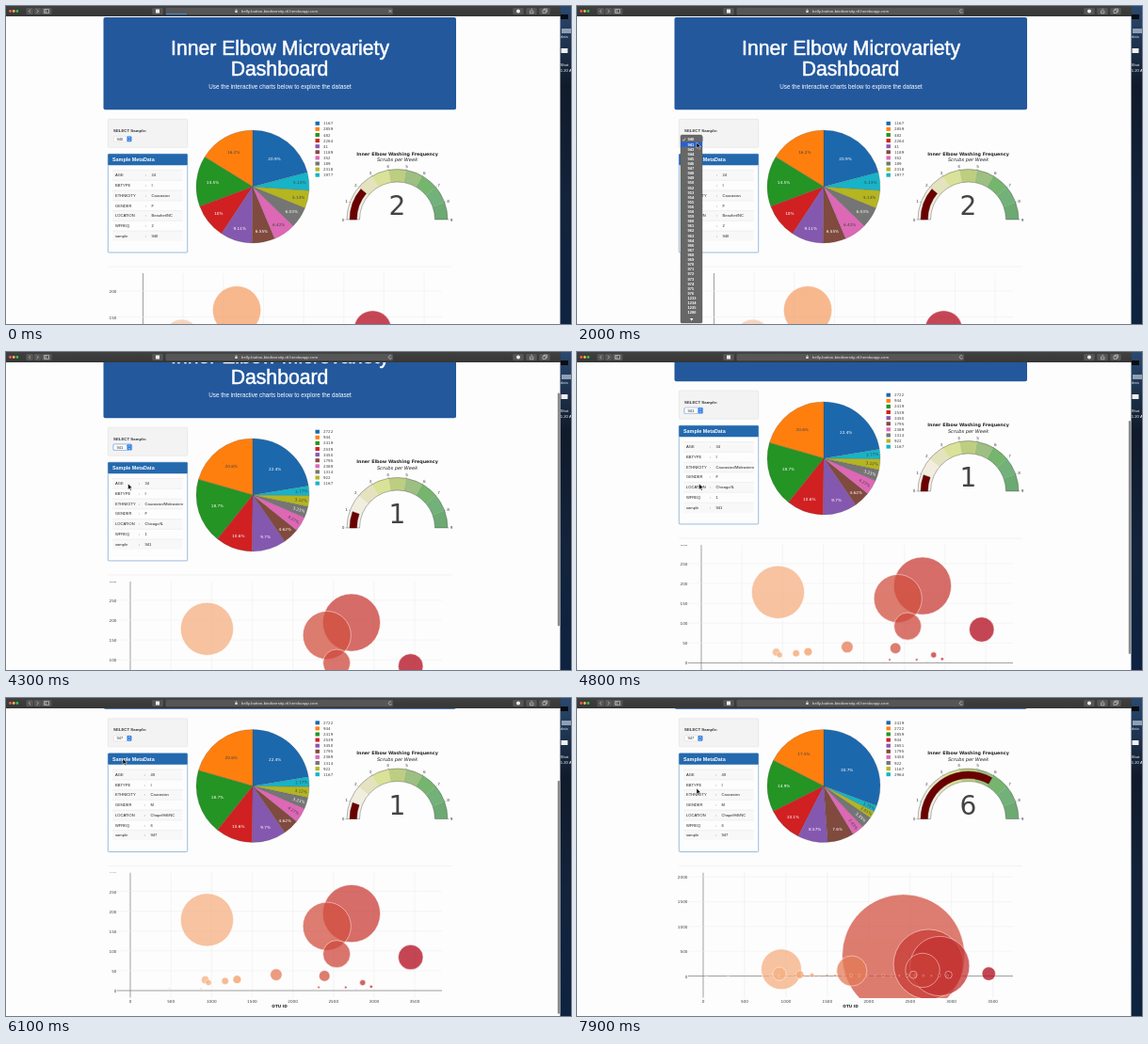
Animation of 600x338 px, one loop 8 s. Source, as an HTML page:

```html
<!DOCTYPE html>
<html lang="en">
<head>
<meta charset="utf-8">
<title>Sample dashboard</title>
<style>
html, body { margin: 0; width: 100%; height: 100%; overflow: hidden; background: #fff; }
svg { display: block; width: 100%; height: 100%; font-family: "Liberation Sans", Arial, sans-serif; }
.plot { font: 4.2px "DejaVu Sans", Verdana, sans-serif; fill: #444; }
.title { font-size: 21.2px; fill: #fff; stroke: #fff; stroke-width: .5; }
.mid { text-anchor: middle; }
.end { text-anchor: end; }
.bold { font-weight: bold; }
</style>
</head>
<body>
<svg id="stage" viewBox="0 0 600 338"></svg>
<script>
const LOOP = 8000;
const PIE = ['#1c68ad', '#ff7f0e', '#249424', '#d02022', '#8558b0', '#804a3e', '#dd68b5', '#757575', '#b5b520', '#17b3c8'];
const DARK_LABEL = [1, 6, 8, 9];
const STEPS = ['240,230,215', '232,226,202', '210,206,145', '190,206,75', '140,170,35', '85,145,35', '14,127,0', '10,120,22', '0,105,11'];

const samples = [
  { id: 940, meta: [24, 'I', 'Caucasian', 'F', 'Beaufort/NC', 2], freq: 2, col: 148,
    otu: [1167, 2859, 482, 2264, 41, 1189, 352, 189, 2318, 1977],
    val: [163, 126, 113, 78, 71, 51, 50, 47, 40, 40],
    small: [], x0: 145.5, kx: .0853, y0: 413, ky: .55, step: 50, lo: 41, hi: 2859 },
  { id: 941, meta: [34, 'I', 'Caucasian/Mideastern', 'F', 'Chicago/IL', 1], freq: 1, col: 141,
    otu: [2722, 944, 2419, 2539, 3450, 1795, 2389, 1314, 922, 1167],
    val: [194, 178, 162, 92, 84, 40, 37, 28, 27, 24],
    small: [[963, 20], [2859, 20], [2964, 10], [2318, 8], [2651, 8], [482, 5], [870, 5], [1960, 3], [2250, 3], [2780, 3], [2907, 3]],
    x0: 132, kx: .0863, y0: 409.5, ky: .422, step: 50, lo: -200, hi: 3450 },
  { id: 947, meta: [49, 'I', 'Caucasian', 'M', 'ChapelHill/NC', 6], freq: 6, col: 147,
    otu: [2419, 2722, 2859, 944, 2651, 1795, 3450, 922, 1167, 2964],
    val: [412, 235, 200, 136, 115, 102, 46, 45, 27, 24],
    small: [[2539, 25], [1314, 15], [41, 8], [302, 7], ...Array.from({ length: 24 }, (_, i) => [720 + i * 97, 5 + i * 5 % 7])],
    x0: 134, kx: .0879, y0: 394, ky: .0527, step: 500, lo: -200, hi: 3450 }
];

const range = (a, b) => Array.from({ length: b - a + 1 }, (_, i) => a + i);
const choices = [940, 941, ...range(943, 950), ...range(952, 956), ...range(958, 964), ...range(966, 976), 1233, 1234, 1235, 1286];
const ROW = 5.11;

const text = (x, y, s, attrs = '') => `<text x="${x}" y="${y}" ${attrs}>${s}</text>`;
const rect = (x, y, w, h, fill, attrs = '') => `<rect x="${x}" y="${y}" width="${w}" height="${h}" fill="${fill}" ${attrs}/>`;
const circle = (x, y, r, fill, attrs = '') => `<circle cx="${x}" cy="${y}" r="${r}" fill="${fill}" ${attrs}/>`;
const path = (d, attrs) => `<path d="${d}" ${attrs}/>`;
const line = (x1, y1, x2, y2, color, w = .5) => path(`M${x1} ${y1}L${x2} ${y2}`, `stroke="${color}" stroke-width="${w}"`);
// Angles run clockwise from twelve o'clock, in radians.
const polar = (cx, cy, r, a) => [cx + r * Math.sin(a), cy - r * Math.cos(a)];

function pie({ val, otu }) {
  const cx = 262, cy = 192, R = 60, sum = val.reduce((a, b) => a + b);
  let back = 0;
  return val.map((v, i) => {
    const f = v / sum, sweep = f * 2 * Math.PI;
    const a = i ? back -= sweep : 0, m = a + sweep / 2;
    const slice = path(`M${cx} ${cy}L${polar(cx, cy, R, a)}A${R} ${R} 0 0 1 ${polar(cx, cy, R, a + sweep)}Z`,
      `fill="${PIE[i]}" stroke="#444" stroke-width=".2"`);
    const [x, y] = polar(cx, cy, R * (.9 - 1.3 * f), m);
    const turn = f < .046 ? m * 180 / Math.PI - 90 + (Math.sin(m) < 0 ? 180 : 0) : 0;
    const label = text(0, 1.5, +(f * 100).toPrecision(3) + '%',
      `class="mid" fill="${DARK_LABEL.includes(i) ? '#444' : '#fff'}" transform="translate(${x} ${y}) rotate(${turn})"`);
    const ly = 124.8 + i * 6.1;
    return slice + label + rect(328.5, ly - 2, 4.4, 4, PIE[i]) + text(337, ly + 1.5, otu[i], 'font-size="4"');
  }).join('');
}

function gauge({ freq }) {
  const cx = 415.5, cy = 227, outer = 53.5, inner = 40, angle = v => (v / 9 - .5) * Math.PI;
  const ring = (r, q, a, b, attrs) => path(
    `M${polar(cx, cy, r, angle(a))}A${r} ${r} 0 0 1 ${polar(cx, cy, r, angle(b))}L${polar(cx, cy, q, angle(b))}A${q} ${q} 0 0 0 ${polar(cx, cy, q, angle(a))}Z`, attrs);
  const ticks = range(0, 9).map(v => {
    const [x, y] = polar(cx, cy, 57.5, angle(v));
    return text(x, y + 1.5, v, 'class="mid"')
      + line(...polar(cx, cy, outer, angle(v)), ...polar(cx, cy, outer + 1.5, angle(v)), '#444', .3);
  }).join('');
  return text(cx, 158.5, 'Inner Elbow Washing Frequency', 'class="mid bold" font-size="4.8" fill="#222"')
    + text(cx, 165, 'Scrubs per Week', 'class="mid" font-size="5.1" font-style="italic" fill="#222"')
    + STEPS.map((c, i) => ring(outer, inner, i, i + 1, `fill="rgba(${c},.57)"`)).join('')
    + ring(outer, inner, 0, 9, 'fill="none" stroke="#444" stroke-width=".4"')
    + ring(50.5, 43, 0, freq, 'fill="#6b0000" stroke="#300" stroke-width=".4"')
    + ticks + text(cx, 222, freq, 'class="mid" font-size="28"');
}

function reds(f) {
  const stops = [[0, 220, 220, 220], [.2, 245, 195, 157], [.4, 245, 160, 105], [1, 178, 10, 28]];
  const i = f < .2 ? 0 : f < .4 ? 1 : 2, [a, b] = [stops[i], stops[i + 1]];
  const k = (f - a[0]) / (b[0] - a[0]);
  return `rgb(${[1, 2, 3].map(j => Math.round(a[j] + (b[j] - a[j]) * k))})`;
}

function bubbles(s) {
  const X = v => s.x0 + v * s.kx, Y = v => s.y0 - v * s.ky;
  let grid = '', labels = '';
  for (let v = 0; X(v) < 461; v += 500) {
    grid += line(X(v), 284, X(v), 417, v ? '#eaeaea' : '#777', v ? .5 : .7);
    labels += text(X(v), 422, v, 'class="mid"');
  }
  for (let v = 0; Y(v) > 282; v += s.step) {
    grid += line(118, Y(v), 463, Y(v), v ? '#eaeaea' : '#777', v ? .5 : .7);
    labels += text(117.5, Y(v) + 2, v, 'class="end"');
  }
  const dots = [...s.otu.map((id, i) => [id, s.val[i]]), ...s.small].map(([id, v]) =>
    circle(X(id), Y(v), v * .158, reds((id - s.lo) / (s.hi - s.lo)),
      `opacity=".75" stroke="#fff" stroke-width="${v < 15 ? .3 : .6}"`)).join('');
  return `<g clip-path="url(#area)">${grid}${dots}</g><g clip-path="url(#labels)">${labels}</g>`
    + text(290.5, 427, 'OTU ID', 'class="mid bold" fill="#222"');
}

function meta(s) {
  const keys = ['AGE', 'BBTYPE', 'ETHNICITY', 'GENDER', 'LOCATION', 'WFREQ', 'sample'];
  return keys.map((k, i) => {
    const y = 180 + i * 10.75;
    return rect(113, y - 5.4, 74.5, 10.75, i % 2 ? '#fdfdfd' : '#f8f8f8') + line(113, y - 5.4, 187.5, y - 5.4, '#ddd', .4)
      + text(116, y + 1.3, k) + text(s.col, y + 1.3, ':') + text(s.col + 6.5, y + 1.3, [...s.meta, s.id][i]);
  }).join('') + text(117.5, 142.9, s.id, 'font-size="4"');
}

const menu = `<g id="menu">${rect(110, -5, 23, 200, '#676767', 'rx="1.5" stroke="#555" stroke-width=".4"')}
  <rect id="hover" x="110" width="23" height="5.1" fill="#2560d0"/>
  <path id="check" d="M112.3 0l1 1.2 1.7-2.8" fill="none" stroke="#fff" stroke-width=".6"/>
  ${choices.map((c, i) => text(117.5, i * ROW + 1.4, c, 'class="bold" font-size="4" fill="#fff"')).join('')}
  ${path('M120 190h3.4l-1.7 2.8z', 'fill="#fff"')}</g>`;

const desktop = rect(588.5, 0, 11.5, 338, 'url(#night)') + rect(589, 9, 8, 5, '#0b0d12') + rect(590, 24, 10, 5, '#8fa0b5')
  + rect(589.5, 45, 7, 5, '#f1f1f1') + text(589, 34, 'data', 'font-size="4" fill="#dde"')
  + text(588.8, 64, 'Shot', 'font-size="4.2" fill="#fff"') + text(588.8, 69.5, '1.20 A', 'font-size="4.2" fill="#fff"');

const button = (x, w) => rect(x - w / 2, 2, w, 7, '#565656', 'rx="1.2"');
const icon = (d, id = '') => path(d, `id="${id}" fill="none" stroke="#ddd" stroke-width=".6"`);
const toolbar = rect(0, 0, 589, 11, 'url(#bar)')
  + ['#fc5b57', '#fdbc40', '#34c84a'].map((c, i) => circle(4.5 + i * 3.7, 5.5, 1.4, c)).join('')
  + button(25.2, 7.4) + button(33.4, 7.4) + button(43, 11) + button(161, 11.5)
  + [544, 558, 572].map(x => button(x, 11.5)).join('')
  + icon('M26 3.8l-1.7 1.7 1.7 1.7M32.7 3.8l1.7 1.7-1.7 1.7M40.5 3.6h5v3.8h-5zM42.2 3.6v3.8')
  + rect(159, 3.5, 4, 4, '#eee') + rect(169.5, 1.8, 241.5, 7.4, '#565656', 'rx="1.5"')
  + rect(243.3, 5, 2.4, 2, '#ddd') + icon('M243.9 5V4.2a.6.6 0 0 1 1.2 0V5')
  + text(290.5, 7, 'belly-button-biodiversity-rtl.herokuapp.com', 'class="mid" font-size="4.3" fill="#f0f0f0"')
  + icon('M409.3 4.4a1.7 1.7 0 1 0 .3 1.7', 'reload') + icon('M406.5 4l3 3m0-3l-3 3', 'stop')
  + circle(544, 5.5, 2, '#eee') + icon('M556.5 4.6v3.2h3.4V4.6M558.2 6.3V2.6M570 4.2h3.2v3.2H570zM571.4 4.2V3h3.2v3.2h-1.4')
  + rect(170, 8, 22, 1.1, '#3a8ae0', 'id="progress"');

const page = rect(103.5, 12, 374.5, 98.3, '#23589d', 'rx="2"')
  + text(291, 51.8, 'Inner Elbow Microvariety', 'class="mid title"')
  + text(290.5, 74, 'Dashboard', 'class="mid title"')
  + text(291, 88, 'Use the interactive charts below to explore the dataset', 'class="mid" font-size="6.3" fill="#fff"')
  + rect(108.3, 120.3, 84.4, 30, '#f3f3f3', 'rx="1" stroke="#e0e0e0" stroke-width=".6"')
  + text(114, 133.7, 'SELECT Sample:', 'class="bold" font-size="4.35" fill="#333"')
  + '<rect id="focus" x="113.5" y="137.7" width="20.6" height="7.2" rx="1.6" fill="#7fb2ee"/>'
  + rect(114.3, 138.4, 19, 5.8, '#fff', 'rx="1" stroke="#bbb" stroke-width=".3"')
  + rect(128.4, 138.4, 5, 5.8, '#2f7fe6', 'rx="1"')
  + path('M129.7 140.8l1.2-1.4 1.2 1.4M129.7 142l1.2 1.4 1.2-1.4', 'fill="none" stroke="#fff" stroke-width=".5"')
  + rect(108.3, 157.3, 84.4, 104.7, '#fdfdfd', 'rx="1" stroke="#5a8fc4" stroke-width=".6"')
  + rect(108.3, 157.3, 84.4, 12, '#2469ae', 'rx="1"')
  + text(113, 165.3, 'Sample MetaData', 'class="bold" font-size="5.4" fill="#fff"')
  + line(108, 277, 473, 277, '#e6e6e6')
  + samples.map(s => `<g class="meta" font-size="4.1" fill="#222">${meta(s)}</g><g class="plot chart">${pie(s)}${gauge(s)}${bubbles(s)}</g>`).join('');

const stage = document.getElementById('stage');
stage.innerHTML = `<defs>
  <linearGradient id="bar" x2="0" y2="1"><stop stop-color="#404040"/><stop offset="1" stop-color="#363636"/></linearGradient>
  <linearGradient id="night" x2="0" y2="1"><stop stop-color="#2a4a70"/><stop offset=".25" stop-color="#101a2a"/><stop offset=".6" stop-color="#13233a"/><stop offset="1" stop-color="#0e2340"/></linearGradient>
  <clipPath id="area"><rect x="118" y="284" width="345" height="133.5"/></clipPath>
  <clipPath id="labels"><rect x="100" y="284" width="372" height="145"/></clipPath></defs>
  ${rect(0, 0, 589, 338, '#fdfdfd')}<g id="page">${page}</g>
  <rect id="thumb" x="585.8" width="2.2" height="248" rx="1.1" fill="#8a8a8a"/>
  ${desktop}${toolbar}${menu}
  <path id="cursor" d="M0 0V6.2L1.5 4.9 2.6 7.2 3.6 6.7 2.5 4.5H4.5Z" fill="#000" stroke="#fff" stroke-width=".5"/>`;

const $ = id => document.getElementById(id);
const [metas, charts] = ['meta', 'chart'].map(c => [...stage.getElementsByClassName(c)]);
const show = (el, on) => { el.style.display = on ? '' : 'none'; };

// Keys are [time, values...], joined by straight segments.
function track(keys, t) {
  const i = keys.findIndex(k => k[0] > t);
  if (i < 0) return keys[keys.length - 1].slice(1);
  if (!i) return keys[0].slice(1);
  const a = keys[i - 1], b = keys[i], k = (t - a[0]) / (b[0] - a[0]);
  return a.slice(1).map((v, j) => v + (b[j + 1] - v) * k);
}
const scrollKeys = [[3750, 0], [4300, 40], [4800, 79], [5080, 98.5]];
const cursorKeys = [[200, 230, -9], [900, 130, 140], [1500, 129, 140.5], [2000, 127, 145], [2700, 127.5, 144.5], [3300, 129, 140],
  [4300, 129.6, 140], [4850, 129.6, 140], [5250, 129, 41], [5450, 128, 42], [5900, 124, 64.5], [6150, 124, 64.5], [6900, 127, 96]];

function draw(now) {
  const t = now % LOOP;
  const [scroll] = track(scrollKeys, t), [x, y] = track(cursorKeys, t);
  const info = t < 2600 ? 0 : t < 6050 ? 1 : 2, data = t < 2850 ? 0 : t < 6400 ? 1 : 2;
  const loading = t < 500;
  $('page').setAttribute('transform', `translate(0 ${-scroll})`);
  metas.forEach((m, i) => show(m, i === info));
  charts.forEach((c, i) => show(c, i === data));
  show($('focus'), t >= 2600 && t < 6050);
  show($('progress'), loading);
  show($('stop'), loading);
  show($('reload'), !loading);
  show($('thumb'), t > 3750 && t < 6300);
  $('thumb').setAttribute('y', 13 + scroll * .76);
  $('cursor').setAttribute('transform', `translate(${x} ${y})`);

  const open = t >= 1100 && t < 2600 || t >= 5350 && t < 6050;
  show($('menu'), open);
  if (open) {
    const top = t < 3000 ? 142 : 42.5 - ROW;
    const row = Math.max(0, Math.round((y + 1 - top) / ROW));
    $('menu').setAttribute('transform', `translate(0 ${top})`);
    $('hover').setAttribute('y', row * ROW - 2.55);
    $('check').setAttribute('transform', `translate(0 ${info * ROW})`);
  }
}

const start = performance.now();
(function frame() {
  draw(performance.now() - start);
  requestAnimationFrame(frame);
})();
</script>
</body>
</html>
```
